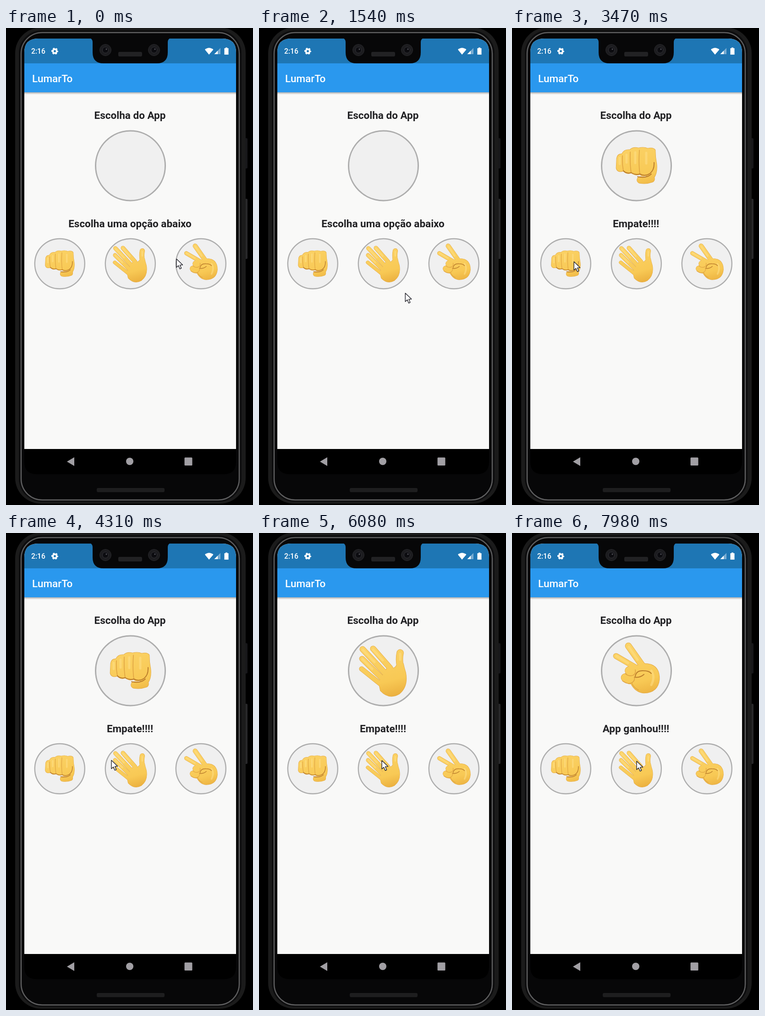
Recreate the animation shown at these times as an HTML page. Size 539 px wide and 1039 px high, loop 8000 ms.

```html
<!DOCTYPE html>
<html lang="pt">
<head>
<meta charset="utf-8">
<title>Jogo de mãos</title>
<style>
html, body { margin: 0; width: 100%; height: 100%; overflow: hidden; background: #000; }
svg { display: block; }
text { font-family: Roboto, sans-serif; font-weight: 500; fill: #fff; }
.label { font-weight: 700; font-size: 22.5px; fill: #212124; text-anchor: middle; }
.hand path { stroke-linecap: round; stroke-linejoin: round; }
.line { fill: none; stroke: #bb7d2c; stroke-width: 2; }
.soft { fill: none; stroke: #dfa341; stroke-width: 1.6; }
.shine { fill: none; stroke: #ffe28c; stroke-width: 5; opacity: .5; }
</style>
</head>
<body>
<svg width="539" height="1039" viewBox="0 0 539 1039">
  <defs>
    <linearGradient id="skin" gradientUnits="userSpaceOnUse" x1="255" y1="245" x2="285" y2="358">
      <stop offset="0" stop-color="#fbd368"/>
      <stop offset=".7" stop-color="#f8c955"/>
      <stop offset="1" stop-color="#ebb03f"/>
    </linearGradient>
    <linearGradient id="shade" x2="0" y2="1">
      <stop stop-color="#000" stop-opacity=".3"/>
      <stop offset="1" stop-color="#000" stop-opacity="0"/>
    </linearGradient>
    <clipPath id="screen"><path d="M40 917V53Q40 23 70 23H472Q502 23 502 53V917Z"/></clipPath>
  </defs>

  <!-- Phone body -->
  <rect x="521" y="240" width="6" height="66" rx="2" fill="#17171a"/>
  <rect x="521" y="372" width="6" height="131" rx="2" fill="#28282a"/>
  <rect x="20" y="-1" width="503" height="1037" rx="56" fill="#1b1b1b"/>
  <rect x="28" y="5" width="486" height="1027" rx="50" fill="#0d0d0e"/>
  <rect x="33" y="10" width="476" height="1018" rx="46" fill="#070708" stroke="#5f5f60" stroke-width="2.5"/>
  <path d="M40 910H502V945Q502 972 475 972H67Q40 972 40 945Z"/>
  <rect x="198" y="1002" width="148" height="9" rx="3" fill="#1e1e1f"/>

  <!-- Screen -->
  <g clip-path="url(#screen)">
    <path d="M40 23H502V917H40Z" fill="#f9f9f8"/>
    <path d="M40 23H502V78H40Z" fill="#1e76b4"/>
    <path d="M40 77H502V140H40Z" fill="#2a98ee"/>
    <path d="M40 140H502V145H40Z" fill="url(#shade)"/>
  </g>
  <path d="M183 22Q189 24 189 31V53Q189 77 213 77H329Q353 77 353 53V31Q353 24 359 22Z" fill="#070708"/>
  <g id="lenses"></g>
  <rect x="245" y="52" width="52" height="10" rx="3" fill="#222224"/>

  <!-- Status bar -->
  <text x="55" y="56" font-size="15.7">2:16</text>
  <g transform="translate(106.5 50.5)" fill="none" stroke="#fff">
    <circle r="4.2" stroke-width="3.6"/>
    <circle r="6.2" stroke-width="2.6" stroke-dasharray="3.6 2.9" stroke-dashoffset="1.8"/>
  </g>
  <path d="M434 47Q443 39.5 452.500 47L443 58Z" fill="#fff"/>
  <path d="M468 43.500V57H454.500Z" fill="#fff" opacity=".4"/>
  <path d="M462 49.500V57H454.500Z" fill="#fff"/>
  <path d="M476.500 44H479V42.500H483V44H485.500V58H476.500Z" fill="#fff"/>

  <text x="57" y="117.500" font-size="22.5">LumarTo</text>
  <text class="label" x="270.500" y="198">Escolha do App</text>
  <text class="label" x="270.500" y="434" id="result"></text>
  <g id="board"></g>

  <!-- Navigation -->
  <g fill="#a19fa4">
    <path d="M133 944.500L149 935V954Z"/>
    <circle cx="270" cy="944" r="8"/>
    <rect x="389.500" y="935.500" width="17" height="17.500" rx="1.500"/>
  </g>

  <path id="cursor" d="M0 0V18.500L4.300 14.600L7.400 21.800L10.600 20.400L7.600 13.400L13.500 13Z"
    fill="#fff" stroke="#24242c" stroke-width="1.400" stroke-linejoin="round"/>
</svg>

<script>
const $ = id => document.getElementById(id);

// A hand is a list of [path, stroke width, filled], outlined together, plus details.
function hand(parts, details) {
  const layer = (color, grow) => parts.map(([d, width, filled]) =>
    `<path d="${d}" fill="${filled ? color : 'none'}" stroke="${color}" stroke-width="${width + grow}"/>`).join('');
  return layer('#e2a844', .6) + layer('url(#skin)', -1) + details;
}
const stroke = (kind, d) => `<path class="${kind}" d="${d}"/>`;

const hands = {
  rock: hand([
    ['M280 331Q293 333 304 329', 15],
    ['M229 284Q231 274 240 275Q245 264 257 266Q264 259 276 262Q288 259 296 263Q308 260 312 266Q312 281 315 296Q317 314 310 325L290 321Q284 324 279 318Q270 322 260 315Q250 319 243 311Q230 315 228 305Z', 2, true]
  ],
    stroke('shine', 'M235 283V296M250 276V293M269 271V294M293 272V295') +
    stroke('soft', 'M241 278Q240 295 243 311M258 270Q257 295 260 315M278 266Q276 297 279 318') +
    stroke('line', 'M243 311Q250 318 260 315Q270 321 279 318Q290 324 301 317Q311 309 310 293') +
    stroke('line', 'M274 324Q294 328 304 318')),

  paper: hand([
    ['M249 252L286 294', 12.5],
    ['M226 253L274 304', 12.5],
    ['M225 274L266 314', 12],
    ['M224 296L264 328', 10.5],
    ['M308 261Q304 279 311 304', 15],
    ['M262 325L283 290Q294 301 301 289L314 285Q316 295 319 304Q325 334 305 350Q284 362 266 343Z', 3, true]
  ],
    stroke('shine', 'M249 254L270 277M227 255L252 281M226 275L247 296M308 263V276')),

  scissors: hand([
    ['M227 268L277 297', 12],
    ['M254 246L288 294', 14],
    ['M266 294Q281 281 303 287Q322 294 321 319Q318 347 288 348Q270 347 260 328Z', 2, true],
    ['M256 300L264 306', 19],
    ['M247 315L257 320', 18]
  ],
    stroke('shine', 'M228 268L253 283M255 248L274 276M304 300Q313 313 304 331') +
    stroke('soft', 'M247 306Q254 313 264 310Q271 306 269 298M241 322Q252 331 262 326') +
    stroke('line', 'M269 312Q271 299 287 300Q299 300 304 306M267 314Q279 316 288 308') +
    stroke('soft', 'M262 326Q269 321 267 314M262 328Q266 337 276 342'))
};

const place = (name, x, y, scale) =>
  `<g class="hand" transform="translate(${x} ${y}) scale(${scale}) translate(-271.500 -300)">${hands[name]}</g>`;
const ring = (x, y, r, width) =>
  `<circle cx="${x}" cy="${y}" r="${r}" fill="#f0f0f0" stroke="#adadad" stroke-width="${width}"/>`;

$('board').innerHTML = ring(271.5, 300, 76, 3) + '<g id="choice"></g>' +
  Object.keys(hands).map((name, i) => {
    const x = 117.3 + 154 * i;
    return ring(x, 513.5, 54.5, 2.4) + place(name, x, 513.5, .716);
  }).join('');

$('lenses').innerHTML = [217, 323].map(x =>
  `<circle cx="${x}" cy="48" r="12.500" fill="#1c1c1f" stroke="#29292c"/>
   <circle cx="${x}" cy="48" r="6.500" fill="#0c0c10" stroke="#333338"/>
   <circle cx="${x + 2}" cy="46" r="1.500" fill="#55555c"/>`).join('');

const LOOP = 8000;
// Cursor: time, x, y
const path = [
  [0, 372, 503], [600, 399, 601], [1200, 380, 600], [2250, 135, 509], [3450, 135, 509],
  [4310, 230, 495], [4700, 255, 491], [5600, 255, 491], [6300, 272, 497], [LOOP, 272, 497]
];
// Rounds: start, message, hand of the app
const rounds = [
  [0, 'Escolha uma opção abaixo', null],
  [2800, 'Empate!!!!', 'rock'],
  [4850, 'Empate!!!!', 'paper'],
  [7450, 'App ganhou!!!!', 'scissors']
];
let shown;

function draw(now) {
  const t = now % LOOP;
  const i = path.findIndex(p => p[0] > t);
  const [t0, x0, y0] = path[i - 1], [t1, x1, y1] = path[i];
  const u = (t - t0) / (t1 - t0), ease = u * u * (3 - 2 * u);
  $('cursor').setAttribute('transform', `translate(${x0 + (x1 - x0) * ease} ${y0 + (y1 - y0) * ease})`);

  const round = rounds.findLast(r => r[0] <= t);
  if (round !== shown) {
    shown = round;
    $('result').textContent = round[1];
    $('choice').innerHTML = round[2] ? place(round[2], 271.5, 300, 1) : '';
  }
  requestAnimationFrame(draw);
}
draw(performance.now());
</script>
</body>
</html>
```
